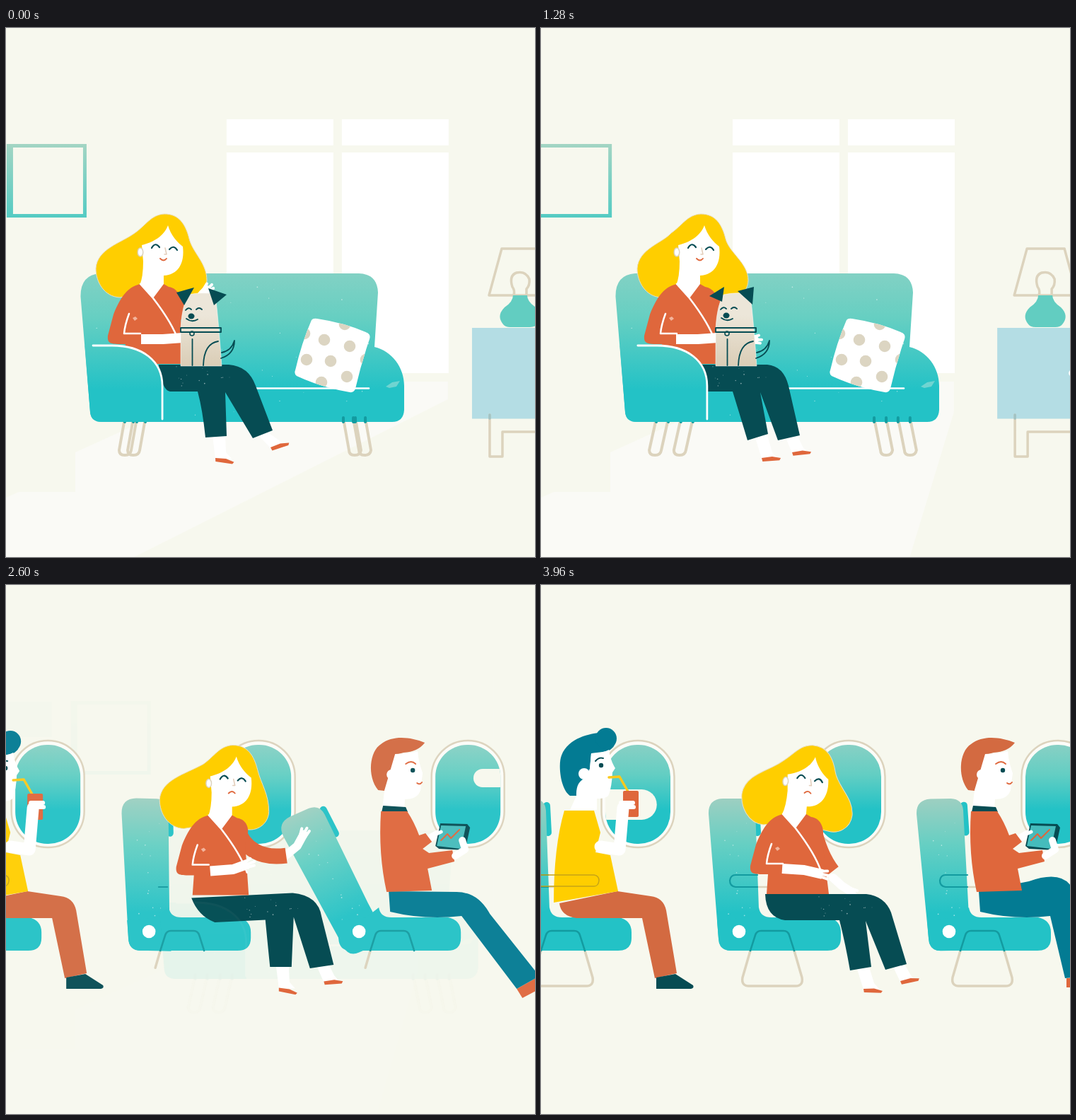
An HTML page that plays this animation: 748 by 748 pixels, repeating every 4000 ms.

```html
<!DOCTYPE html>
<html lang="en">
<head>
<meta charset="utf-8">
<title>From sofa to seat</title>
<style>
html, body { margin: 0; width: 100%; height: 100%; overflow: hidden; background: #f7f8ee; }
svg { display: block; width: 100vw; height: 100vh; }
</style>
</head>
<body>
<svg viewBox="0 0 748 748" fill="none">
  <defs>
    <linearGradient id="sofa" gradientUnits="userSpaceOnUse" x1="0" y1="347" x2="0" y2="557">
      <stop stop-color="#82d1c4"/><stop offset=".3" stop-color="#66cfc2"/><stop offset=".78" stop-color="#23c2c6"/>
    </linearGradient>
    <linearGradient id="seat" gradientUnits="userSpaceOnUse" x1="0" y1="302" x2="0" y2="517">
      <stop stop-color="#9dcfc1"/><stop offset=".3" stop-color="#66cfc3"/><stop offset=".75" stop-color="#23c2c6"/>
    </linearGradient>
    <linearGradient id="glass" x2="0" y2="1">
      <stop stop-color="#88d0c4"/><stop offset=".3" stop-color="#63cec3"/><stop offset=".65" stop-color="#23c2c6"/>
    </linearGradient>
    <linearGradient id="frame" x2="0" y2="1"><stop stop-color="#a3d5c3"/><stop offset="1" stop-color="#54cbc3"/></linearGradient>
    <linearGradient id="fur" x2="0" y2="1"><stop offset=".3" stop-color="#ece6d9"/><stop offset="1" stop-color="#dacdb6"/></linearGradient>
    <clipPath id="cushion"><path d="M432 413Q434 410 440 411Q480 417 511 431Q516 434 514 440Q502 475 494 510Q492 516 486 515Q445 508 411 492Q407 489 409 484Q418 445 432 413Z"/></clipPath>
    <clipPath id="pane"><rect x="91" y="226" width="92" height="140" rx="45"/></clipPath>
  </defs>
  <g id="stage"></g>
</svg>
<script>
const LOOP = 4000;
const C = { paper: '#f7f8ee', teal: '#23c2c6', deep: '#064c53', line: '#dcd3bd', shade: '#139ba0', red: '#df673c', rust: '#d36a41', gold: '#ffce00', blue: '#037b93' };
const NUM = /-?\d+\.?\d*/g;
const ease = x => x * x * (3 - 2 * x);

// Blends the numbers of neighbouring [time, value] steps; values are numbers or path strings.
function at(t, ...steps) {
  const i = steps.findIndex(s => s[0] > t);
  if (i < 1) return String(steps.at(i < 0 ? -1 : 0)[1]);
  const [t0, a] = steps[i - 1], [t1, b] = steps[i];
  const e = ease((t - t0) / (t1 - t0)), goal = String(b).match(NUM);
  let n = 0;
  return String(a).replace(NUM, v => +(+v + (goal[n++] - v) * e).toFixed(2));
}
const num = (...args) => +at(...args);

const fill = (d, color, more = '') => `<path d="${d}" fill="${color}" ${more}/>`;
const stroke = (d, color, w = 2, more = '') =>
  `<path d="${d}" stroke="${color}" stroke-width="${w}" stroke-linecap="round" stroke-linejoin="round" ${more}/>`;
const rect = (x, y, w, h, color, rx = 0, more = '') =>
  `<rect x="${x}" y="${y}" width="${w}" height="${h}" rx="${rx}" fill="${color}" ${more}/>`;
const dot = (x, y, r, color, more = '') => `<circle cx="${x}" cy="${y}" r="${r}" fill="${color}" ${more}/>`;
const group = (transform, body, more = '') => `<g transform="${transform}" ${more}>${body}</g>`;
const shrink = (x, y, s, body) => s > .01 ? group(`translate(${x} ${y}) scale(${s}) translate(${-x} ${-y})`, body) : '';

function specks(seed, count, x, y, w, h) {
  const rnd = () => (seed = seed * 16807 % 2147483647) / 2147483647;
  let out = '';
  while (count--) out += dot((x + rnd() * w).toFixed(1), (y + rnd() * h).toFixed(1), (.4 + rnd() * .5).toFixed(2), '#fff', 'opacity=".55"');
  return out;
}
const sofaSpecks = specks(71, 45, 128, 360, 385, 190);
const legSpecks = specks(23, 14, 245, 480, 80, 30);
const seatSpecks = specks(9, 14, 260, 330, 40, 170);

function hairpins(x, gap, lean) {
  const pin = p => {
    const l = p + lean, r = l + 17;
    return stroke(`M${p} 552L${l} 597Q${l} 604 ${l + 8} 604Q${r - 1} 604 ${r} 597L${p + 17} 552`, C.line, 4);
  };
  return pin(x) + pin(x + gap);
}
const pinTops = (x, gap) => stroke([0, 17, gap, gap + 17].map(d => `M${x + d} 551v6`).join(''), C.shade, 4);

function room(k) {
  const wx = 312 - 41.5 * k, fx = 1 - 14 * k, cx = 659 - 14 * k;
  const left = [168 - 5 * k, 12 + 23 * k], right = [477 - 6 * k, 14 + 20 * k];
  const panes = [0, 163].map(d => rect(wx + d, 129, 151, 37, '#fff') + rect(wx + d, 176, 151, 312, '#fff')).join('');
  const lamp = group(`translate(${cx})`,
    stroke('M42 312H95L113 378H24Z', C.line, 3.5) +
    stroke('M59 378Q61 371 57 366Q52 350 63 346Q76 343 81 355Q82 364 77 369L77 378', C.line, 3.5) +
    fill('M58 378H78Q78 387 90 395Q102 407 92 419Q89 423 82 423H54Q47 423 44 419Q34 407 46 395Q58 387 58 378Z', '#62cdc1') +
    rect(0, 424, 130, 128.5, '#b4dde4') + dot(106, 488, 5, '#fff') +
    stroke('M25 547V606H43V571H130', C.line, 3.5) + stroke('M25 547V552', '#a0c3c4', 3.5));
  return panes +
    rect(-140, 165, 100, 50, '#b4dde4') + `<circle cx="-52" cy="247" r="13" stroke="#f5dc7c" stroke-width="5"/>` +
    fill(`M${fx} 164h113v104h-113zm9 5v94h99v-94z`, 'url(#frame)', 'fill-rule="evenodd"') + lamp +
    hairpins(...left, -8 - 2 * k) + hairpins(...right, 8 + k) +
    fill('M133 347H499Q525 348 526 374L521 451C546 457 563 480 563 506V540Q562 557 546 557H136Q120 557 119 543L105.500 380Q105 349 133 347Z', 'url(#sofa)') +
    sofaSpecks + fill('M537 507l9 -6 11 -2 -5 8 -10 2z', '#8fdcd6', 'opacity=".7"') +
    stroke('M315 509.500H513', '#fff', 2.6) + pinTops(...left) + pinTops(...right);
}

function armrest(k) {
  const a = 14 * k, edge = `C${192 + a} 449 ${221 + a} 470 ${221 + a} 506V`;
  return fill(`M111.500 449H${150 + a}${edge}557H136Q120 557 119 543Z`, 'url(#sofa)')
    + stroke(`M${123 + a} 449H${150 + a}${edge}553`, '#fff', 2.8);
}

function dog(t) {
  const ears = at(t,
    [200, 'M241 374L266 367L252 392Z M286 368L312 377L294 392Z'],
    [520, 'M256 380L258 379L257 381Z M290 390L312 403L290 416Z'],
    [900, 'M256 380L258 379L257 381Z M290 390L312 403L290 416Z'],
    [1180, 'M238 379L259 366L256 387Z M278 372L301 366L299 391Z']);
  const face = at(t, [200, '0 0'], [520, '4 -14'], [900, '4 -14'], [1180, '0 -1']);
  return fill('M258 377Q276 373 296 376Q301 420 305 478H247V424Q249 392 258 377Z', 'url(#fur)', 'stroke="#fff" stroke-opacity=".5"') +
    fill(ears, C.deep) +
    group(`translate(${face})`,
      stroke('M254 399q4 -5 8 -1M269 398q4 -4 8 0M255 411q8 6 16 1', C.deep, 1.8) +
      `<ellipse cx="262" cy="407.500" rx="4.500" ry="4" fill="${C.deep}"/>`) +
    stroke('M247 424H304V430H247ZM263.500 440V477M279 477Q280 446 300 443M304 467Q323 461 323 442Q319 456 305 459', C.deep, 1.8) +
    `<circle cx="263" cy="432" r="3" stroke="${C.deep}" stroke-width="1.600"/>`;
}

function cushion() {
  const spots = [[422, 432], [450, 441], [486, 450], [425, 469], [459, 471], [482, 493], [446, 501], [479, 419], [509, 469]];
  return `<g clip-path="url(#cushion)">${rect(400, 405, 120, 115, '#fff')}${spots.map(([x, y]) => dot(x, y, 8.3, '#dcd5c2')).join('')}</g>`;
}

function foot(pose) {
  const [ax, ay, x, y, turn] = pose.split(' ').map(Number);
  return fill(`M${ax - 9} ${ay - 2}H${ax + 9}L${x + 15} ${y - 8}L${x + 23} ${y + 1}H${x}Z`, '#fff')
    + group(`translate(${x} ${y}) rotate(${turn})`, fill('M0 0L15 -1L27 2L25 5H1Z', C.red));
}

// Three fingers continuing the last part of an arm.
function hand(path) {
  const [x0, y0, x, y] = path.match(NUM).map(Number).slice(-4);
  const a = Math.atan2(y - y0, x - x0) * 180 / Math.PI;
  return group(`translate(${x} ${y}) rotate(${a})`, stroke('M-2 -4L6 -6M0 0H10M-2 4L8 5', '#fff', 4));
}

function woman(t) {
  const shift = at(t, [700, '0 0'], [1280, '2 0'], [1800, '3 0'], [2320, '55 -33'], [2880, '138 -40'], [3360, '151 -39'], [3960, '152 -38']);
  const tilt = num(t, [2600, 0], [2880, 0], [3300, 5]);
  const l = num(t, [0, 127], [600, 133], [1280, 134], [1900, 132], [2320, 123], [2880, 118], [3360, 132], [3960, 130]);
  const r = num(t, [0, 284], [600, 291], [1280, 291], [1900, 288], [2320, 278], [2880, 272], [3360, 291], [3960, 288]);
  const hair = `M224 263C245 263 254 278 259 298C264 318 ${r} 332 ${r} 357C${r - 1} 376 ${r - 18} 385 ${r - 32} 382L200 374L${l + 34} 381C${l + 12} 380 ${l} 359 ${l} 340C${l + 2} 312 ${l + 36} 304 182 290C198 279 205 264 224 263Z`;
  const open = t > 2120 && t < 2580;
  const bend = num(t, [2100, 5], [2600, -5]);
  const face =
    fill('M229 279C223 295 208 303 192 307L194 330Q194 352 189 364L208 384L223 364V350C243 349 253 333 250 309C242 303 233 293 229 279Z', '#fff') +
    `<ellipse cx="190" cy="317" rx="3.800" ry="6" fill="#fff" stroke="${C.line}" stroke-width="1.500"/>` +
    stroke('M206 311q5 -9 11 -1M231 313q6 -7 11 1', C.deep, 2.2) + stroke('M225 311L227 320H224', '#e2cdb9', 1.5) +
    (open ? `<ellipse cx="223" cy="329" rx="4" ry="4.500" fill="${C.red}"/>` : stroke(`M218 ${328.5 - bend / 2}q5 ${bend} 9 0`, C.red, 1.9));
  const resting = 'M218 476L320 476Q343 478 350 506L366 576L335 583L310 515L321 574L292 583Q279 540 271 514L232 514Q220 512 218 476Z';
  const legs = at(t,
    [0, 'M216 476L315 476Q343 478 353 506L377 569L349 580L310 515L312 577L282 579Q278 540 271 514L232 514Q220 512 216 476Z'],
    [600, 'M216 476L318 476Q343 478 350 506L369 576L337 583L311 515L317 575L287 581Q279 540 271 514L232 514Q220 512 216 476Z'],
    [1280, resting], [1800, resting],
    [2320, 'M221 445L362 443Q400 446 401 478L404 554L372 552L362 481L348 557L318 551Q319 500 322 480L255 480Q235 468 221 445Z'],
    [2880, 'M303 440L448 428Q483 432 491 460L522 520L487 532L451 458L459 523L428 529Q418 490 411 467L335 474Q308 468 303 440Z'],
    [3360, 'M317 437L460 437Q486 440 495 463L517 536L487 544L459 475L467 540L437 545Q430 505 422 474L345 474Q318 470 317 437Z']);
  const feet =
    foot(at(t, [0, '301 578 296 608 8'], [600, '307 578 305 608 2'], [1280, '311 578 312 608 -4'], [1800, '311 578 312 608 -4'], [2320, '334 554 323 583 22'], [2880, '447 526 448 556 1'], [3360, '455 542 456 571 2'])) +
    foot(at(t, [0, '363 575 374 593 -18'], [600, '356 579 356 601 -8'], [1280, '354 579 355 600 -6'], [1800, '354 579 355 600 -6'], [2320, '391 553 388 575 8'], [2880, '504 526 510 546 -17'], [3360, '506 540 508 560 -12']));
  const sleeve = at(t, [0, 'M238 378Q246 398 254 406'], [1800, 'M238 378Q246 398 256 412'], [2320, 'M283 344Q306 386 360 378'], [2880, 'M368 342Q380 394 432 387'], [3360, 'M385 342Q394 382 412 405']);
  const reach = at(t, [0, 'M256 404L278 376L284 370'], [220, 'M256 404L278 376L284 370'], [540, 'M266 430L290 440L302 440'], [1800, 'M266 430L290 441L302 441'],
    [2320, 'M360 378L375 366L382 351'], [2880, 'M430 387L448 372L459 354'], [3360, 'M413 412L430 421L452 427'], [3960, 'M413 414L425 425L439 434']);
  const forearm = at(t, [0, 'M191 440L222 440L250 438'], [1800, 'M191 440L222 440L250 438'], [2320, 'M248 407L282 400L299 381'], [2880, 'M329 402L360 404L384 408'], [3360, 'M341 401L372 403L398 409']);
  const hem = num(t, [2320, 255], [2880, 238], [3360, 255]);
  const torso =
    fill(`M190 362C170 366 160 385 152 405L144 435C143 446 148 447 163 447H169L167 475H${hem}L${hem / 2 + 118} 398C250 385 245 368 230 366L223 362L208 382Z`, C.red) +
    stroke('M190 362L208 382C228 408 238 425 244 443M174 404Q168 420 167 432H190', '#fff', 2.5) +
    fill('M179 410l4 -2 3 3 -4 3z', '#f3b49c');
  const head = body => group(`translate(${shift}) rotate(${tilt} 208 360)`, body);
  const butt = 'style="stroke-linecap:butt"';
  return head(fill(hair, C.gold, 'stroke="#eadfc0" stroke-width="1"')) +
    stroke(reach, '#fff', 12) + hand(reach) + stroke(sleeve, C.red, 22, butt) +
    feet + head(face) +
    fill(legs, C.deep) + group(`translate(${shift})`, group('translate(-4 -2)', legSpecks) + torso) +
    stroke(forearm, '#fff', 14, butt) + hand(forearm);
}

// A cabin seat in the middle place; the back turns about the hinge.
function seat(x, lean, drawn) {
  const trace = `pathLength="1" stroke-dasharray="${drawn} 2"`;
  return group(`translate(${x})`,
    stroke('M296 517L285 555Q283 567 294 567H360Q371 567 369 555L358 517', C.line, 3.5, trace) +
    stroke('M267 418Q268 427 275 427H350', C.line, 2.5, trace) +
    group(`rotate(${lean} 280 490)`,
      rect(300, 307, 10, 48, C.teal, 5, 'transform="rotate(-3 305 331)"') +
      fill('M257 302H286Q302 303 303 319L308 458L312 517H268Q252 517 251 500L237 324Q236 303 257 302Z', 'url(#seat)') + seatSpecks) +
    fill('M268 517H405Q424 517 424 499V491Q424 474 406 470H326Q310 470 308 456L290 470L249 474L251 500Q252 517 268 517Z', C.teal) + dot(280, 490, 9.3, '#fff') +
    stroke('M296 517L303 495Q305 489 311 489H343Q349 489 351 495L358 517', C.shade, 2.5) +
    (lean > -5 ? stroke('M306 427H275Q267 426 267 418Q268 410 275 410H306', C.shade, 2.2, trace) : ''));
}

function porthole(x, t, clouds) {
  const drift = (t - 3360) * -.25;
  return group(`translate(${x})`,
    `<rect x="85.500" y="220" width="103" height="151" rx="51" fill="#fcfcf8" stroke="${C.line}" stroke-width="2.500"/>` +
    rect(91, 226, 92, 140, 'url(#glass)', 45) +
    `<g clip-path="url(#pane)">${clouds.map(([cx, y, w, h]) => rect(cx + drift, y, w, h, C.paper, h / 2)).join('')}</g>`);
}

function drinker(t) {
  const sway = at(t, [2880, '-3 2'], [3360, '0 0'], [3960, '5 -2']);
  const step = num(t, [2880, -4], [3360, 0], [3960, -4]);
  const head =
    fill('M36 300C22 290 19 255 24 243C34 217 66 212 78 211L100 226Q96 237 82 238L66 240L64 262L58 276L46 300Z', C.blue) + dot(87, 219, 15, C.blue) +
    fill('M66 240Q82 240 91 235Q93 250 100 261L96 267Q95 288 91 298Q89 304 74 304V320H36L45 300Q44 280 58 275L64 262Z', '#fff') + dot(56, 269, 8, '#fff') +
    dot(80, 257, 3.2, C.deep) + stroke('M72 251q5 -6 11 -4', C.deep, 2) +
    stroke('M91 274L106 273L118 294', '#fbc91c', 3.5) + rect(111, 293, 22, 37, C.red, 2);
  return fill(`M26 450L108 433L155 440Q173 442 177 460L${196 + step} 549L${165 + step} 556L143 471H50Q28 468 26 450Z`, C.rust) +
    fill('M167 554L194 549L219 565Q221 569 216 570H167Z', C.deep, `transform="translate(${step} ${-step / 4})"`) +
    fill('M33 319H75L84 350L77 378L98 382L109 433L18 449Q18 370 33 319Z', C.gold) +
    group(`translate(${sway})`, head) +
    stroke('M84 370L111 374L116 315', '#fff', 17) + stroke('M113 308H130M114 314H131', '#fff', 6) +
    stroke('M-33 410H75Q82 411 82 418Q81 426 75 426H-33', '#c6a417', 1.5);
}

function reader(t) {
  const legs = at(t,
    [3300, 'M619 433L715 434Q745 434 762 465L832 553L800 571L722 468Q670 474 621 462Z'],
    [3900, 'M619 433L690 419Q738 402 752 430L775 552L741 556L720 468Q670 474 621 462Z']);
  const shoe = at(t, [3300, 'M800 571L832 553L842 566L808 584Z'], [3900, 'M743 556L775 553L790 569L743 569Z']);
  return fill(shoe, C.red) + fill(legs, C.blue) +
    fill('M604 290C588 270 592 235 608 225C625 212 650 215 670 223Q660 236 640 237L629 240L627 262L613 291Z', C.rust) +
    fill('M628 239Q648 238 660 235Q661 250 667 266L664 290Q660 303 642 303L641 315H610L613 290Z', '#fff') + dot(623, 268, 7, '#fff') +
    dot(653, 262, 3.2, C.deep) + stroke('M643 253q8 -6 14 0M659 280q4 3 7 -1', C.red, 1.8) +
    fill('M611 312L643 314L646 321H609Z', C.deep) +
    stroke('M672 361L688 352', '#fff', 11) +
    fill('M608 320H645Q655 335 662 354L671 351L680 363L667 373L676 379L709 375L712 391L674 401L680 432L616 434Q604 380 608 320Z', C.red) +
    fill('M692 337L730 338L734 343L727 375L690 373L685 369Z', C.deep) + fill('M693 340L728 341L721 373L687 369Z', '#45bcbc') +
    stroke('M693 361L702 352L707 358L719 346', C.red, 2) +
    stroke('M713 383L727 374L723 361', '#fff', 10) + stroke('M680 355L693 349', '#fff', 5);
}

function cabin(t) {
  const x = num(t, [2440, -100], [2880, -27], [3360, 0]);
  const drawn = num(t, [2500, 0], [2880, .8], [3060, 1.1]);
  const lean = num(t, [2880, -24], [3200, 2], [3360, 0], [3700, 0], [3960, -1]);
  return group(`translate(${x})`,
    porthole(0, t, [[132, 260, 70, 28], [204, 289, 110, 43]]) +
    porthole(298, t, [[2, 289, 60, 42]]) +
    porthole(594, t, [[-45, 260, 50, 26], [122, 283, 70, 22], [109, 315, 80, 17], [128, 302, 70, 16]]) +
    seat(-296, 0, drawn) + seat(0, num(t, [2880, 1.5], [3300, 0]), drawn) + seat(297, lean, drawn) +
    drinker(t) + reader(t));
}

function draw(t) {
  const k = 1 - Math.exp(-t / 280);
  const pan = num(t, [1950, 0], [2320, 43], [2660, 110]);
  const home = num(t, [2460, 1], [2620, 0]);
  const inRoom = body => home > 0 ? group(`translate(${pan})`, body, `opacity="${home}"`) : '';
  const edge = 625 - 41.5 * k;
  const light = fill(`M98 600L230 540V500H${edge}V${525 + 18 * k}L${180 + 345 * k} 748H0V664L18 656H98Z`, '#fafaf6', `opacity="${home}"`);
  return (home > 0 ? light : '') + inRoom(room(k)) +
    (home < 1 ? `<g opacity="${1 - home}">${cabin(t)}</g>` : '') + woman(t) +
    inRoom(armrest(k) + shrink(275, 478, num(t, [1720, 1], [2040, 0]), dog(t)) +
      shrink(462, 505, num(t, [1820, 1], [2160, 0]), cushion()));
}

const stage = document.getElementById('stage');
const start = performance.now();
function tick() {
  stage.innerHTML = draw((performance.now() - start) % LOOP);
  requestAnimationFrame(tick);
}
tick();
</script>
</body>
</html>
```
